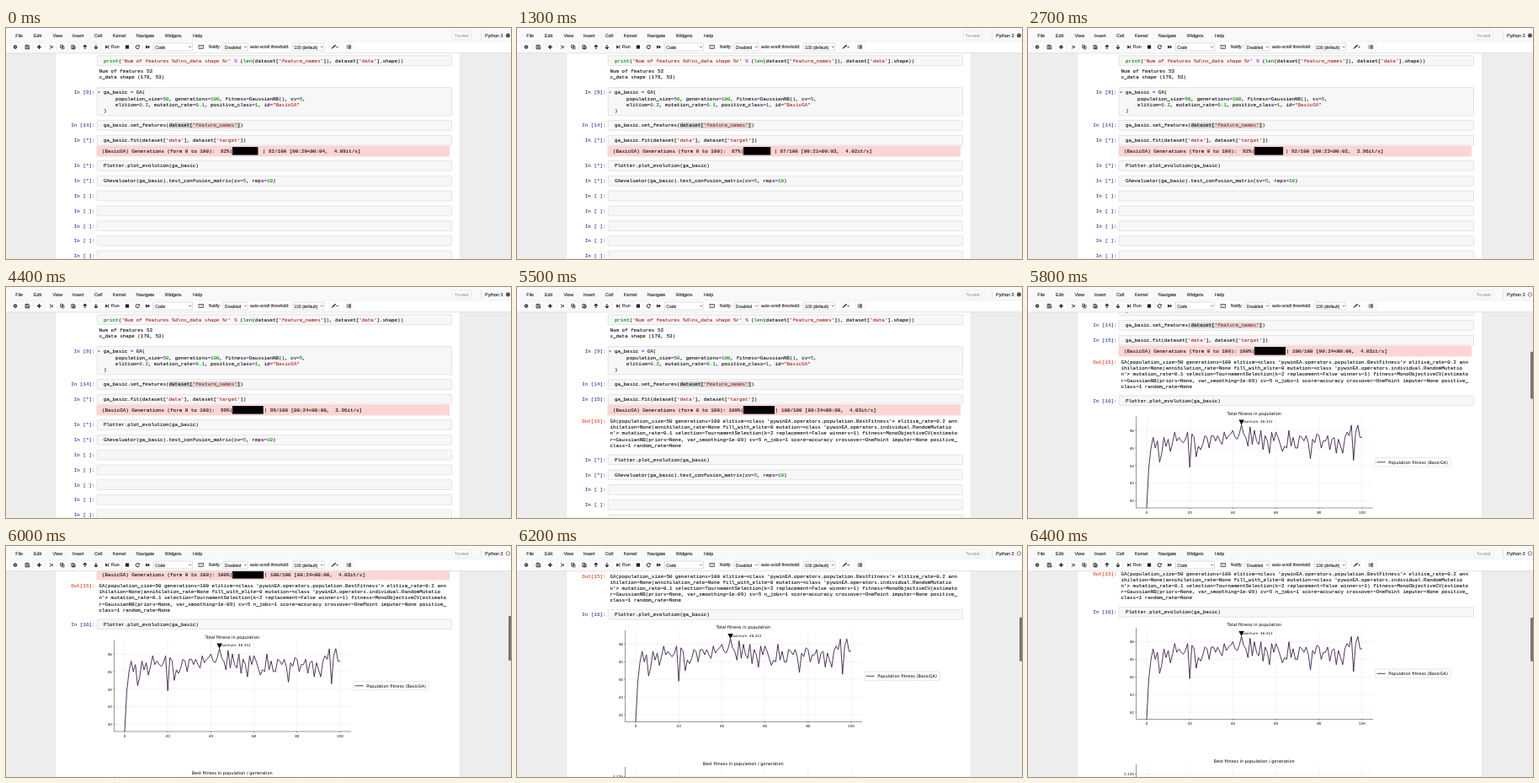
Recreate the animation shown at these times as an HTML page. Size 600 by 274 pixels, loop 6600 ms.

```html
<!DOCTYPE html>
<html lang="en">
<head>
<meta charset="utf-8">
<title>Notebook run</title>
<style>
  html, body { margin: 0; width: 100%; height: 100%; overflow: hidden; background: #ededed; }
  svg { display: block; width: 600px; height: 274px; }
  text { white-space: pre; }
  .mono { font: 5.89px "Liberation Mono", "Courier New", monospace; stroke: currentColor; stroke-width: .1px; fill: currentColor; color: #111; }
  .in { color: #303f9f; }
  .out { color: #d84315; }
  .str { color: #ba2121; fill: currentColor; stroke: currentColor; }
  .num { color: #080; fill: currentColor; stroke: currentColor; }
  .key { color: #008000; fill: currentColor; stroke: currentColor; }
  .op { color: #a2f; fill: currentColor; stroke: currentColor; font-weight: bold; }
  .ui { font: 5.46px "Liberation Sans", Arial, sans-serif; fill: #222; stroke: #222; stroke-width: .1px; }
  .small { font-size: 5px; }
  .faint { fill: #888; stroke: none; }
  .plot { font: 5.02px "DejaVu Sans", Verdana, sans-serif; fill: #000; }
  .tick { font-size: 4.2px; fill: #111; }
</style>
</head>
<body>
<svg id="stage" viewBox="0 0 600 274"></svg>
<script>
const LOOP = 6600, DONE = 4600, PLOTTED = 5600;
const CHAR = 3.534, LINE = 7.15, SHIFT = 41.4;
const CURVE = "#35143f";
const NS = "http://www.w3.org/2000/svg";

function add(parent, tag, attrs = {}, content = "") {
  const el = document.createElementNS(NS, tag);
  for (const k in attrs) el.setAttribute(k, attrs[k]);
  el.textContent = content;
  return parent.appendChild(el);
}
const group = parent => add(parent, "g");
const rect = (p, x, y, width, height, fill, more) => add(p, "rect", { x, y, width, height, fill, ...more });
const line = (p, d, stroke, w = .6, more) => add(p, "path", { d, stroke, "stroke-width": w, fill: "none", ...more });
const shape = (p, d, fill = "#222") => add(p, "path", { d, fill });
// y is the middle of the capitals
const label = (p, x, y, str, cls, anchor = "start") =>
  add(p, "text", { x, y: y + 1.9, class: cls, "text-anchor": anchor }, str);
const show = (el, on) => el.setAttribute("visibility", on ? "visible" : "hidden");
const moveY = (el, y) => el.setAttribute("transform", `translate(0 ${y})`);

const TOKEN = /('[^']*'|"[^"]*")|\b(\d[\d.]*)|\b(print|len)\b|([=%])/g;
function code(p, x, y, src) {
  const el = label(p, x, y, "", "mono");
  let at = 0;
  for (const m of src.matchAll(TOKEN)) {
    el.append(src.slice(at, m.index));
    const cls = m[1] ? "str" : m[2] ? "num" : m[3] ? "key" : "op";
    add(el, "tspan", { class: cls }, m[0]);
    at = m.index + m[0].length;
  }
  el.append(src.slice(at));
}

function cell(p, y, prompt, lines = []) {
  const h = 11.8 + Math.max(0, lines.length - 1) * LINE;
  rect(p, 108.2, y - 5.9, 421.3, h, "#f7f7f7", { stroke: "#cfcfcf", "stroke-width": .5, rx: .8 });
  lines.forEach((s, i) => code(p, 116, y + i * LINE, s));
  return label(p, 105.5, y, prompt, "mono in", "end");
}

const svg = document.getElementById("stage");
rect(svg, 0, 0, 600, 274, "#ededed");
rect(svg, 58.7, 0, 480.6, 274, "#fff", { stroke: "#e2e2e2", "stroke-width": .6 });
const page = group(svg);

// Cells above the run
cell(page, 38.7, "", ["print('Num of features %d\\nx_data shape %r' % (len(dataset['feature_names']), dataset['data'].shape))"]);
label(page, 110.5, 51, "Num of features 53", "mono");
label(page, 110.5, 58.2, "x_data shape (178, 53)", "mono");
cell(page, 76.5, "In [9]:", [
  "ga_basic = GA(",
  "    population_size=50, generations=100, fitness=GaussianNB(), cv=5,",
  "    elitism=0.2, mutation_rate=0.1, positive_class=1, id=\"BasicGA\"",
  ")"
]);
shape(page, "M109.2 75.6h2.6l-1.3 2z", "#555");
cell(page, 115.5, "In [14]:");
rect(page, 116 + 22 * CHAR, 112, 24 * CHAR, 7, "#d7d4d4");
code(page, 116, 115.5, "ga_basic.set_features(dataset['feature_names'])");

// Running cell with its progress bar
const fitPrompt = cell(page, 133.2, "In [*]:", ["ga_basic.fit(dataset['data'], dataset['target'])"]);
rect(page, 107.5, 139.6, 419.5, 12.9, "#fdd5d5");
const head = label(page, 114, 146, "", "mono");
const bar = rect(page, 113.4 + 44 * CHAR, 141.1, 0, 9.5, "#000");
const tail = label(page, 0, 146, "", "mono");

const result = group(page);
label(result, 105.5, 159.2, "Out[15]:", "mono out", "end");
[
  "GA(population_size=50 generations=100 elitism=<class 'pywinEA.operators.population.BestFitness'> elitism_rate=0.2 ann",
  "ihilation=None|annihilation_rate=None fill_with_elite=0 mutation=<class 'pywinEA.operators.individual.RandomMutatio",
  "n'> mutation_rate=0.1 selection=TournamentSelection(k=2 replacement=False winners=1) fitness=MonoObjectiveCV(estimato",
  "r=GaussianNB(priors=None, var_smoothing=1e-09) cv=5 n_jobs=1 score=accuracy crossover=OnePoint imputer=None positive_",
  "class=1 random_rate=None"
].forEach((s, i) => label(result, 110.5, 159.2 + i * LINE, s, "mono"));

const plotCell = group(page);
const plotPrompt = cell(plotCell, 163.4, "In [*]:", ["Plotter.plot_evolution(ga_basic)"]);
const rest = group(page);
cell(rest, 181.3, "In [*]:", ["GAevaluator(ga_basic).test_confusion_matrix(cv=5, reps=10)"]);
for (let i = 0; i < 5; i++) cell(rest, 199.1 + i * 17.75, "In [ ]:");

// Charts; fitness is 40 plus tenths
const fitness = [16, 39, 50, 56, 50, 54, 42, 47, 56, 51, 55, 48, 53, 59, 54, 56, 54, 53, 55, 59,
  39, 58, 56, 45, 51, 49, 52, 57, 56, 50, 57, 57, 54, 57, 54, 52, 59, 55, 57, 58,
  60, 56, 55, 58, 63.1, 58, 56, 51, 62, 52, 60, 54, 52, 60, 49, 57, 54, 47, 59, 54,
  59, 56, 52, 48, 51, 50, 60, 51, 56, 50, 50, 57, 56, 54, 57, 53, 44, 55, 53, 58,
  57, 50, 54, 54, 57, 49, 55, 56, 47, 55, 51, 47, 56, 59, 57, 63, 43, 59, 63, 56, 56];
const px = n => 141 + n * 2.56;
const py = v => 240.1 + (46 - v) * 20.85;

const charts = group(page);
label(charts, 268.7, 219.6, "Total fitness in population", "plot", "middle");
for (let n = 0; n <= 100; n += 20) {
  line(charts, `M${px(n)} 223.5V332M${px(n)} 385.5V440`, "#e4e4e4", .4);
  line(charts, `M${px(n)} 332v1.5`, "#222", .4);
  label(charts, px(n), 336.9, n, "plot tick", "middle");
}
for (let v = 42; v <= 46; v++) {
  line(charts, `M128.5 ${py(v)}H410`, "#e4e4e4", .4);
  line(charts, `M128.5 ${py(v)}h-1.5`, "#222", .4);
  label(charts, 126, py(v) - .2, v, "plot tick", "end");
}
line(charts, "M128.5 223.5V332H410", "#333", .5);
line(charts, "M" + fitness.map((d, n) => `${px(n)} ${py(40 + d / 10)}`).join("L"), CURVE, .85, { "stroke-linejoin": "round" });
label(charts, 252.7, 229.4, "Maximum: 46.312", "plot tick");
shape(charts, "M250.4 227.6h6.4l-3.2 5.8z", "#000");
rect(charts, 412.8, 272.6, 89.4, 10.3, "#fff", { rx: 1, stroke: "#ccc", "stroke-width": .5 });
line(charts, "M414.6 277.8h10", CURVE, .85);
label(charts, 428.3, 277.8, "Population fitness (BasicGA)", "plot");
label(charts, 268.7, 381.3, "Best fitness in population / generation", "plot", "middle");
line(charts, "M128.5 385.5V440", "#333", .5);
line(charts, "M128.5 397h-1.5", "#222", .4);
line(charts, "M128.5 397H410", "#e4e4e4", .4);
label(charts, 126, 396.8, "1.125", "plot tick", "end");

const thumb = rect(svg, 597, 0, 3.6, 0, "#757575", { rx: 1.5 });

// Fixed header
rect(svg, 0, 0, 600, 29.6, "#fff");
rect(svg, 0, 0, 600, 16, "#f9f9f9");
line(svg, "M0 16H600", "#e7e7e7", .5);
line(svg, "M0 29.7H600", "#d4d4d4", .7);
const menu = { File: 11.3, Edit: 32.8, View: 55.5, Insert: 79, Cell: 105, Kernel: 126.8, Navigate: 154.8, Widgets: 188.7, Help: 222 };
for (const name in menu) label(svg, menu[name], 8.8, name, "ui");
rect(svg, 530, 4, 22.5, 9.6, "#fbfbfb", { stroke: "#ddd", "stroke-width": .5, rx: .8 });
label(svg, 541.2, 8.9, "Trusted", "ui small faint", "middle");
line(svg, "M564.5 3.5V14", "#ccc", .5);
label(svg, 569, 8.8, "Python 3", "ui");
const kernel = add(svg, "circle", { cx: 596.4, cy: 8.9, r: 2.2, stroke: "#333", "stroke-width": .6 });

const button = (x, w) => rect(svg, x, 17.6, w, 9.8, "#fff", { stroke: "#ddd", "stroke-width": .4, rx: .7 });
for (const x of [11, 25.3, 39.4, 53.8, 66.8, 79.8, 93.8, 106.9, 144, 156.3, 168.5, 390, 407.5]) button(x - 6.2, 12.4);
button(113.4, 24.4);
add(svg, "circle", { cx: 11, cy: 22.5, r: 1.8, fill: "#888", stroke: "#222", "stroke-width": 1 });
line(svg, "M23 20.3h3.7l1.1 1.1v3.5H23zM24.2 20.3v1.5h2v-1.5M24.2 24.7v-1.6h2.4v1.6", "#222", .8);
line(svg, "M37 22.5h4.8M39.4 20.1v4.8", "#222", 1.3);
line(svg, "M51.8 20.5l4.2 3.3M51.8 24.5l4.2-3.3", "#222", .9);
line(svg, "M64.6 20.2h2.8v3.2h-2.8zM66.2 21.7H69v3.2h-2.8z", "#222", .7);
line(svg, "M77.8 20.4H81v4.2h-3.2zM79.4 21.9h2.7v3h-2.7z", "#222", .8);
line(svg, "M93.8 25v-4.5M91.7 22.4l2.1-2.1 2.1 2.1", "#222", 1.1);
line(svg, "M106.9 20v4.5M104.8 22.6l2.1 2.1 2.1-2.1", "#222", 1.1);
shape(svg, "M118.2 20.3l3 2.2-3 2.2zM121.4 20.3h.8v4.4h-.8z");
label(svg, 124.8, 22.5, "Run", "ui");
shape(svg, "M141.9 20.4h4.2v4.2h-4.2z");
line(svg, "M158 21.4a2.1 2.1 0 1 0 .3 1.8", "#222", 1);
shape(svg, "M158.9 20v2.2h-2.2z");
shape(svg, "M166 20.3l2.5 2.2-2.5 2.2zM168.5 20.3l2.5 2.2-2.5 2.2z");

function select(x, w, str) {
  rect(svg, x, 18, w, 9, "#fff", { stroke: "#bbb", "stroke-width": .5, rx: .7 });
  label(svg, x + 2, 22.7, str, "ui small");
  line(svg, `M${x + w - 4.2} 21.8l1.3 1.3 1.3-1.3`, "#222", .7);
}
select(175.3, 46.2, "Code");
rect(svg, 229, 20.6, 5.6, 3.8, "#fff", { stroke: "#333", "stroke-width": .7 });
line(svg, "M230 21.8h3.8M230.6 23.3h2.6", "#333", .6, { "stroke-dasharray": ".6 .4" });
label(svg, 240.8, 22.5, "Notify:", "ui small");
select(257.8, 29.5, "Disabled");
label(svg, 290, 22.5, "auto-scroll threshold:", "ui small");
select(340.2, 38, "100 (default)");
shape(svg, "M386.4 25l1.2-2.4 1.2 1.2zM388 22.5l3.2-2.7.9.7-2.8 3.1z");
shape(svg, "M392.2 22h2.6l-1.3 1.6z");
line(svg, "M406.5 20.8h3.6M406.5 22.5h3.6M406.5 24.2h3.6", "#222", 1);
line(svg, "M404.7 20.8h1M404.7 22.5h1M404.7 24.2h1", "#222", 1);

// Motion: iteration times in ms, then scroll positions held for 100 ms each
const ticks = [0, 300, 500, 800, 1000, 1300, 1600, 1900, 2100, 2300, 2600, 2800, 3100, 3400, 3600, 3900, 4100, 4400, 4600];
const scrolls = [12, 39.4, 70, 95, 112, 119.5, 123.5, 125.8, 126.5];
const pad = s => "00:" + String(Math.floor(s)).padStart(2, "0");

function speed(k) {
  if (k < 10) return 4.09 - .013 * k;
  return k === 18 ? 4.03 : 3.96 + .03 * Math.sin((k - 10) * Math.PI / 7);
}

function draw(t) {
  const k = ticks.filter(ms => ms <= t).length - 1;
  const n = 82 + k, rate = speed(k);
  const done = t >= DONE, plotted = t >= PLOTTED;
  head.textContent = `(BasicGA) Generations (form 0 to 100): ${String(n).padStart(3)}%|`;
  // Block glyphs are a little wider than letters, so the tail drifts right
  bar.setAttribute("width", n * .372);
  tail.setAttribute("x", 114 + 54 * CHAR + (n - 80) * .1);
  tail.textContent = `| ${n}/100 [${pad(20.1 + ticks[k] / 1000)}<${pad((100 - n) / rate)},  ${rate.toFixed(2)}it/s]`;

  fitPrompt.textContent = done ? "In [15]:" : "In [*]:";
  plotPrompt.textContent = plotted ? "In [16]:" : "In [*]:";
  show(result, done);
  show(rest, !plotted);
  show(charts, plotted);
  show(thumb, plotted);
  moveY(plotCell, done ? SHIFT : 0);
  moveY(rest, done ? SHIFT : 0);
  kernel.setAttribute("fill", plotted ? "#fff" : "#555");

  const step = Math.min(scrolls.length - 1, Math.floor((t - PLOTTED) / 100));
  const y = plotted ? scrolls[step] : 0;
  moveY(page, -y);
  // The page grows while it scrolls, so the thumb shrinks
  thumb.setAttribute("y", 66.5 + y * .145);
  thumb.setAttribute("height", 61 - y * .07);
}

function frame() {
  draw(performance.now() % LOOP);
  requestAnimationFrame(frame);
}
frame();
</script>
</body>
</html>
```
